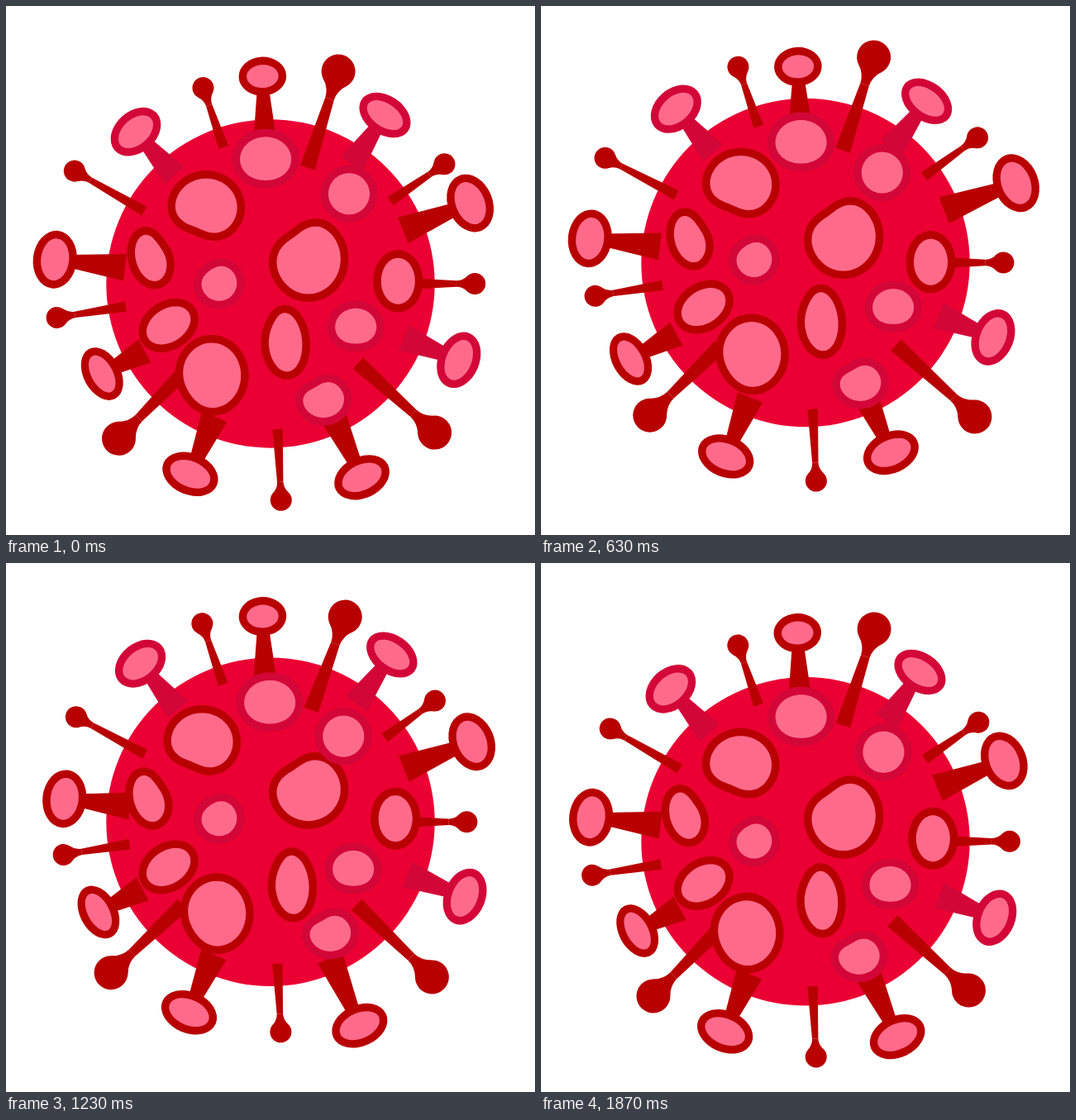
Animation, 640 px wide and 640 px high, one loop 1930 ms. Source, as an HTML page with a canvas:

```html
<!DOCTYPE html>
<html lang="en">
<head>
<meta charset="utf-8">
<title>Virus</title>
<style>
  html, body { margin: 0; width: 100%; height: 100%; overflow: hidden; background: #fff; }
  canvas { display: block; width: 640px; height: 640px; }
</style>
</head>
<body>
<canvas id="stage" width="640" height="640"></canvas>
<script>
const ctx = document.getElementById('stage').getContext('2d');
const LOOP = 1930;
const RED = '#eb0033', DARK = '#b90000', CRIMSON = '#d30638', PINK = '#ff6a8b';
const RING = 9.5;
const BASE = 175;      // distance of stem bases from the body centre
const FOLLOW = 0.55;   // share of a head's stretch that its stem base follows

let phase = 0;
const rad = deg => deg * Math.PI / 180;

// Periodic swing that peaks at the given phase, in degrees of the loop.
const wave = (size, peak, cycles = 1) => size * Math.cos(cycles * phase - rad(peak));

function oval(color, x, rx, ry) {
  ctx.fillStyle = color;
  ctx.beginPath();
  ctx.ellipse(x, 0, rx, ry, 0, 0, 2 * Math.PI);
  ctx.fill();
}

// Draws along the x axis, which points outward from the body centre.
function outward(angle, draw) {
  ctx.save();
  ctx.rotate(rad(angle));
  draw();
  ctx.restore();
}

function stem(color, from, fromWidth, to, toWidth) {
  ctx.fillStyle = color;
  ctx.beginPath();
  ctx.moveTo(from, -fromWidth / 2);
  ctx.lineTo(to, -toWidth / 2);
  ctx.lineTo(to, toWidth / 2);
  ctx.lineTo(from, fromWidth / 2);
  ctx.fill();
}

// Spike with a flat ringed head.
function stud(angle, reach, stretch, color = DARK, wide = 35, deep = 25) {
  outward(angle, () => {
    const x = reach + stretch;
    stem(color, BASE + FOLLOW * stretch, wide * 0.94, x, 11);
    oval(color, x, deep, wide);
    oval(PINK, x, deep - RING, wide - RING);
  });
}

// Spike with a solid drop-shaped head; big ones are rooted deeper.
function pin(angle, reach, stretch, big = false) {
  const r = big ? 20.5 : 13, neck = big ? 5.5 : 3.7;
  const base = big ? BASE - 30 : BASE;
  outward(angle, () => {
    const x = reach + stretch, join = x - r * 1.7;
    stem(DARK, base + FOLLOW * stretch, big ? 18.5 : 12.5, join, neck * 2);
    oval(DARK, x, r, r);
    const bx = x - r * 0.7, by = r * 0.7;
    ctx.beginPath();
    ctx.moveTo(bx, -by);
    ctx.quadraticCurveTo(x - r * 1.15, -neck, join, -neck);
    ctx.lineTo(join, neck);
    ctx.quadraticCurveTo(x - r * 1.15, neck, bx, by);
    ctx.fill();
  });
}

// Ringed oval on the face, flattened by `dent` on the side facing `side`.
function spot(color, x, y, rx, ry, { turn = 0, dent = 0, side = 0 } = {}) {
  ctx.save();
  ctx.translate(x, y);
  ctx.rotate(rad(turn));
  ctx.beginPath();
  for (let deg = 0; deg < 360; deg += 5) {
    const a = rad(deg), facing = Math.max(0, Math.cos(a - rad(side)));
    const k = 1 - dent * facing ** 4;
    ctx.lineTo(k * rx * Math.cos(a), k * ry * Math.sin(a));
  }
  ctx.closePath();
  ctx.lineJoin = 'round';
  ctx.lineWidth = 2 * RING;
  ctx.strokeStyle = color;
  ctx.stroke();
  ctx.fillStyle = PINK;
  ctx.fill();
  ctx.restore();
}

function drawStuds() {
  stud(-92.2, 246.3, wave(8.9, -57), DARK, 28.8, 23.5);
  stud(-21.5 + wave(0.8, 125), 264.6, wave(7.7, 122), DARK, 36, 27);
  stud(65.6 + wave(0.9, 197), 260.4, wave(10.3, 263));
  stud(112.8 + wave(0.5, -84), 251.2, wave(2.2, 124));
  stud(151.8 + wave(0.7, -87), 235.5, wave(6.2, 135), DARK, 34, 22.5);
  stud(186.4, 258.4, wave(7.7, 59), DARK, 35, 26.5);
  stud(-54.4 + wave(1.6, 153), 247, wave(3.5, -98), CRIMSON, 34, 23.5);
  stud(21.6 + wave(0.6, 38), 247.4, wave(4.7, 250), CRIMSON);
  stud(229.6 + wave(1.2, 194), 245.7, wave(2.9, -90), CRIMSON, 34);
}

function drawPins() {
  pin(-71.3 + wave(1.3, 222), 265.5, wave(4.6, -22), true);
  pin(42.8 + wave(1.05, 236), 271.7, wave(5.5, 131), true);
  pin(135.5 + wave(1.2, 205), 263.8, wave(1.8, 211), true);
  pin(-35.6 + wave(1.1, 6), 253.1, wave(6.3, 69));
  pin(0, 241.5, wave(5.7, 6));
  pin(87.2, 260.1, wave(6.2, 71));
  pin(171, 257.6, wave(4.5, 28));
  pin(208.7 + wave(1.35, -27), 271.4, wave(4.2, 59));
  pin(251, 251.6, wave(2.2, 240));
}

function drawSpots() {
  spot(DARK, -79.7 + wave(3.2, 55), -94.5 + wave(2.5, 29), 37.5, 35, { dent: 0.24, side: 114 });
  spot(DARK, 45.8, -33.7 + wave(5.7, 50), 39, 40.8 + wave(2.5, 45), { dent: 0.24, side: 236 });
  spot(DARK, 152.4 + wave(1.9, 0), -2.8 + wave(2.1, 101), 20.5, 28);
  spot(DARK, -144 + wave(4.5, 98), -29.7 - wave(1.8, 0), 18.5, 29, { turn: -15, dent: 0.18, side: -30 });
  spot(DARK, -123.4, 52.8 - wave(2.4, 10), 29, 20, { turn: -33 });
  spot(DARK, -67.4 - wave(3.9, -7), 111, 35.5, 39.5, { dent: 0.07, side: 145 });
  spot(DARK, 20.9 - wave(5, 51), 72.4 - wave(3.3, 55), 20.5, 36, { turn: -5, dent: 0.12, side: 225 });
  spot(CRIMSON, -4 - wave(3.2, 54), -147 - wave(3.7, 5), 31, 27, { dent: 0.05, side: 90 });
  spot(CRIMSON, 92 + wave(3.8, 39), -107 - wave(3.5, 61), 25, 25);
  spot(CRIMSON, -62.2, -3 + wave(2.3, 0), 21.5, 21.5, { dent: 0.12, side: 235 });
  spot(CRIMSON, 103 + wave(3.6, 87), 54.5 - wave(2.7, 36), 25, 22.5, { dent: 0.1, side: 90 });
  spot(CRIMSON, 67.5 - wave(4.7, 42), 139.3 + wave(6.5, 87), 25, 22.5, { dent: 0.25, side: 238 });
}

function drawFrame(ms) {
  phase = (ms % LOOP) / LOOP * 2 * Math.PI;
  const bob = wave(15.2, -17) + wave(1.4, -57, 2) + wave(0.9, 0, 3);
  ctx.setTransform(1, 0, 0, 1, 0, 0);
  ctx.fillStyle = '#fff';
  ctx.fillRect(0, 0, 640, 640);
  ctx.translate(320, 319.8 + bob);
  oval(RED, 0, 198.7, 198.7);
  drawStuds();
  drawPins();
  drawSpots();
}

const start = performance.now();
function tick() {
  drawFrame(performance.now() - start);
  requestAnimationFrame(tick);
}
tick();
</script>
</body>
</html>
```
